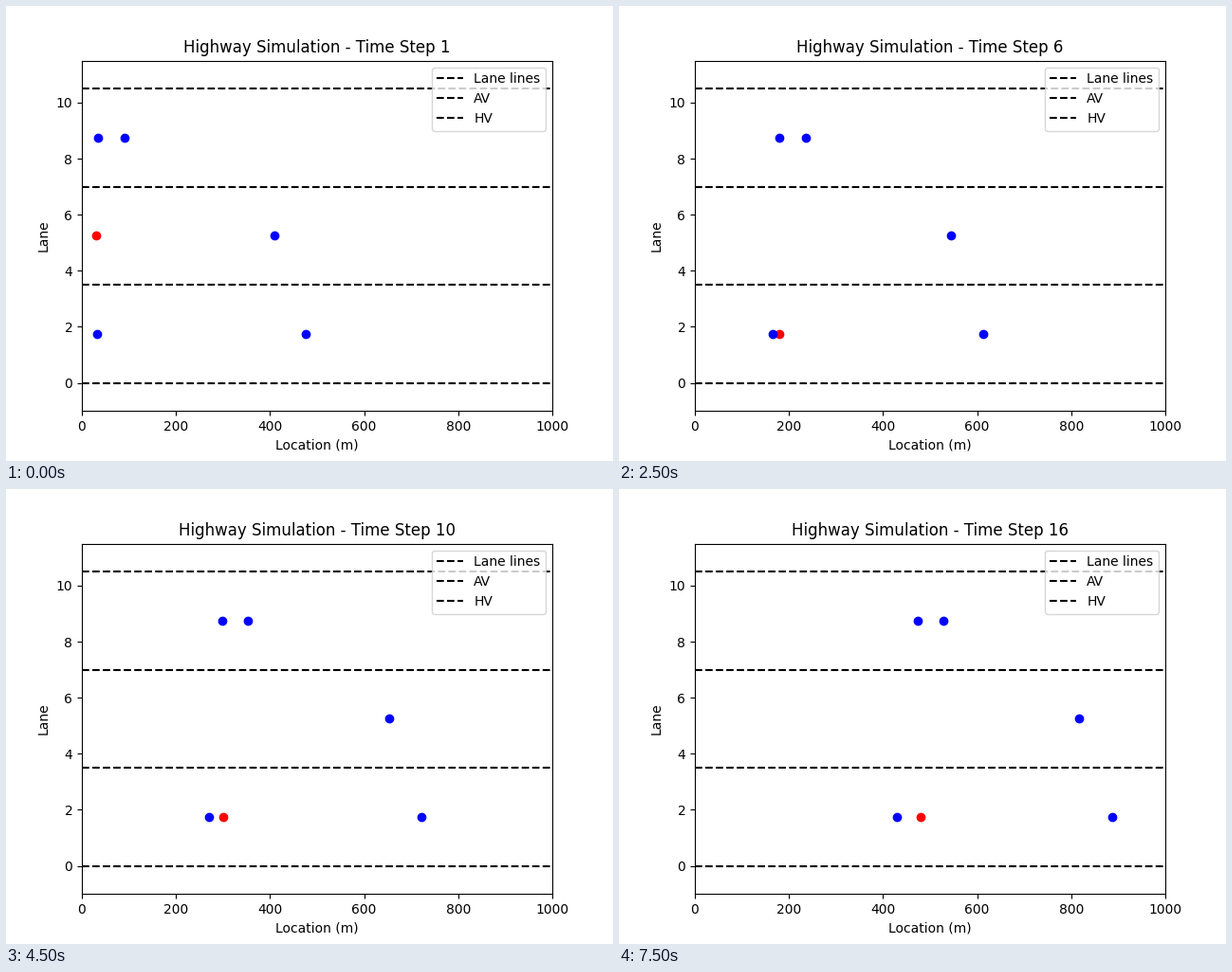
Recreate the animation shown at these times as a matplotlib script. Size 640 by 480 pixels, loop 8000 ms.

```python
import matplotlib.pyplot as plt
from matplotlib.animation import FuncAnimation

STEPS = 16
INTERVAL = 500
LANE_WIDTH = 3.5
LANES = 3
CHANGE_STEP = 2  # the AV moves to the bottom lane here

# (start in m, metres per step, lane)
HUMAN_CARS = [
    (33.12, 26.39, 0),
    (475.60, 27.46, 0),
    (409.10, 27.16, 1),
    (33.67, 29.31, 2),
    (90.90, 29.17, 2),
]
AV_START, AV_SPEED = 30, 30


def lane_center(lane):
    return (lane + 0.5) * LANE_WIDTH


fig, ax = plt.subplots(figsize=(6.4, 4.8), dpi=100)
ax.set_xlim(0, 1000)
ax.set_ylim(-1, LANES * LANE_WIDTH + 1)
ax.set_xlabel("Location (m)")
ax.set_ylabel("Lane")
title = ax.set_title("")

lines = [ax.axhline(i * LANE_WIDTH, color="black", linestyle="--")
         for i in range(LANES + 1)]
ax.legend(lines[:3], ["Lane lines", "AV", "HV"], loc="upper right")

av, = ax.plot([], [], "ro")
humans, = ax.plot([], [], "bo")
humans.set_ydata([lane_center(lane) for _, _, lane in HUMAN_CARS])


def update(step):
    title.set_text(f"Highway Simulation - Time Step {step + 1}")
    lane = 1 if step < CHANGE_STEP else 0
    av.set_data([AV_START + AV_SPEED * step], [lane_center(lane)])
    humans.set_data([x + v * step for x, v, _ in HUMAN_CARS],
                    [lane_center(lane) for _, _, lane in HUMAN_CARS])
    return title, av, humans


anim = FuncAnimation(fig, update, frames=STEPS, interval=INTERVAL,
                     repeat=True, repeat_delay=0, blit=False)
plt.show()
```
